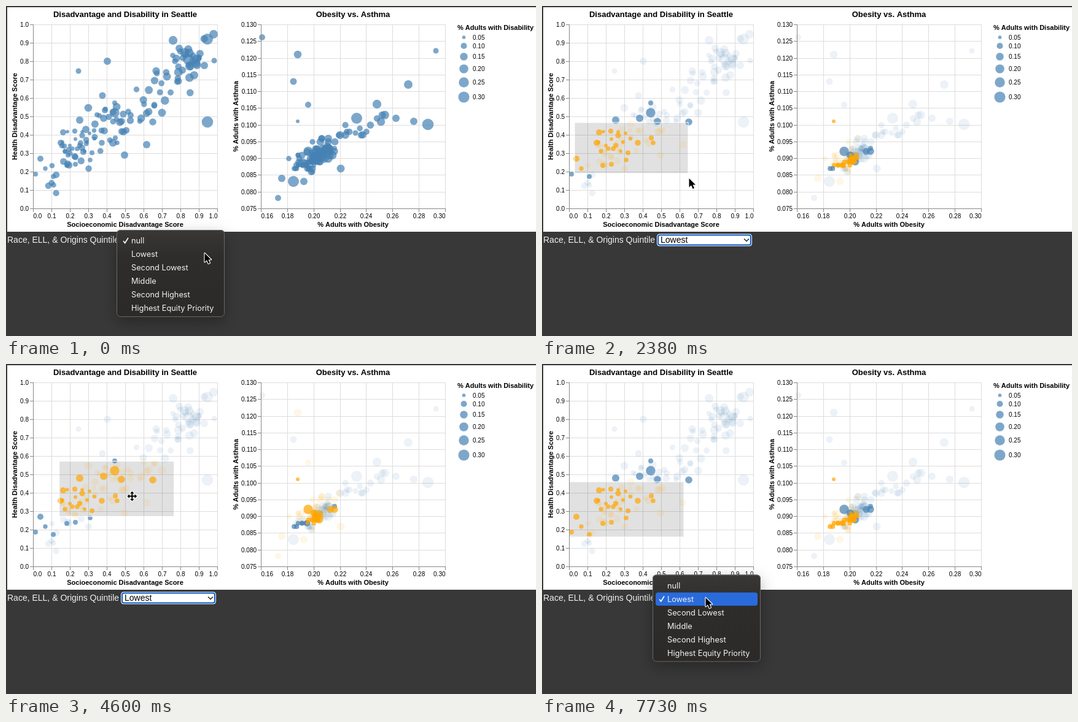
Animation, 863 px wide and 538 px high, one loop 8 s. Source, as an HTML page with a canvas:

```html
<!DOCTYPE html>
<html lang="en">
<head>
<meta charset="utf-8">
<title>Linked scatter plots</title>
<style>
html, body { margin: 0; width: 100%; height: 100%; overflow: hidden; background: #383838; }
canvas { display: block; }
</style>
</head>
<body>
<canvas id="stage" width="863" height="538"></canvas>
<script>
const ctx = document.getElementById('stage').getContext('2d');
const LOOP = 8000, STEP = 1040 / 7, LAST_STEP = 52;
const SANS = '"Liberation Sans", Arial, sans-serif';
const MENU_FONT = '12.75px Inter, sans-serif';
const BLUE = '#4682b4', ORANGE = '#ffa500';
const OPTIONS = ['null', 'Lowest', 'Second Lowest', 'Middle', 'Second Highest', 'Highest Equity Priority'];

// Each row: x, y, radius in the left plot, then x, y in the right plot if it stands out there.
const lowRows = [
  [120, 186, 6, 502, 243], [159, 183, 6, 510, 254], [177, 158, 4, 535, 232], [177, 174, 7.7, 492, 237],
  [188, 188, 5.8, 528, 237], [239, 189, 5.8, 535, 237], [113, 217, 3, 475, 188],
  [48, 274, 4], [56, 249, 5], [64, 265, 3.7], [77, 278, 4], [89, 223, 5], [93, 206, 5], [99, 260, 4],
  [113, 258, 4], [137, 251, 3.8], [124, 211, 4.7], [156, 223, 4.8], [178, 215, 4], [181, 223, 3.8]];
const restRows = [
  [328, 189, 9.3, 687, 193], [338, 46, 7, 655, 128], [339, 89, 4.5, 700, 73], [323, 97, 6, 635, 183],
  [282, 69, 6, 664, 188], [268, 141, 5, 417, 51], [134, 166, 6.3, 475, 79], [328, 54, 9, 571, 183],
  [297, 87, 9, 468, 286], [157, 146, 5.5, 468, 123], [161, 170, 5, 492, 161], [203, 178, 5, 443, 313],
  [165, 90, 6, 581, 210], [118, 106, 4.5, 569, 207], [229, 226, 6, 449, 281], [193, 243, 6, 485, 286],
  [254, 174, 6.5, 545, 265], [272, 56, 7.2, 604, 160]];

// Step, x, y
const pointer = [
  [0, 323, 402], [1, 300, 404], [3, 290, 402], [8, 55, 191], [10, 53, 190], [16, 239, 280],
  [17, 241, 299], [20, 228, 282], [24, 168, 238], [26, 168, 238], [28, 171, 248], [33, 224, 198],
  [37, 224, 198], [38, 223, 197], [43, 146, 251], [45, 145, 254], [46, 145, 254], [52, 266, 380]];
const brushSize = [[10, 0, 0], [16, 185, 83], [17, 187, 90]];
const brushPlace = [
  [19, 53, 190], [24, 44, 190], [26, 44, 190], [28, 44, 200], [33, 110, 136], [37, 110, 136],
  [38, 107, 135], [43, 44, 189], [45, 44, 192]];

function random(seed) {
  return () => {
    seed = (seed * 1664525 + 1013904223) >>> 0;
    return seed / 4294967296;
  };
}
const rnd = random(29);
const spread = () => rnd() + rnd() - 1;

const obesityX = v => 415.5 + (Math.round(v * 1000) - 160) * 300 / 140;
const asthmaY = v => 330.5 - (Math.round(v * 1000) - 75) * 300 / 55;

function lowPoint([lx, ly, r, rx, ry]) {
  const t = Math.min(1, Math.max(0, (278 - ly) / 75));
  return {
    lx, ly, r, low: true,
    rx: rx || obesityX(0.188 + 0.017 * t + 0.005 * spread()),
    ry: ry || asthmaY(0.0872 + 0.003 * t + 0.0015 * spread())
  };
}

function smallLow(i) {
  const lx = 92 + 4 * i;
  return lowPoint([lx, 222 + 18 * Math.sin(i * 2.2), 2.7 + 1.6 * rnd()]);
}

// Correlated cloud along the diagonal of both plots.
function restPoint(i, count) {
  const t = i / (count - 1), cluster = i % 5 === 0 && t > 0.3;
  const lx = cluster ? 300 + 30 * spread() : 72 + 250 * t + 14 * spread();
  const ly = cluster ? 88 + 24 * spread() : 270 - 0.76 * (lx - 72) + 48 * spread();
  const core = i % 5 < 3;
  const u = core ? 0.196 + 0.015 * t : 0.184 + 0.062 * t * t + 0.01 * t;
  const rise = core ? 0.0885 + 0.0045 * t : 0.0865 + 0.015 * t;
  return {
    lx, ly, r: 3 + 2 * t + 2.6 * rnd(), low: false,
    rx: obesityX(u + 0.005 * spread()),
    ry: asthmaY(rise + 0.003 * spread())
  };
}

const points = [
  ...restRows.map(([lx, ly, r, rx, ry]) => ({ lx, ly, r, rx, ry, low: false })),
  ...Array.from({ length: 96 }, (_, i) => restPoint(i, 96)),
  ...lowRows.map(lowPoint),
  ...Array.from({ length: 14 }, (_, i) => smallLow(i))];

function sample(keys, s) {
  if (s <= keys[0][0]) return keys[0].slice(1);
  const n = keys.findIndex(k => k[0] >= s);
  if (n < 0) return keys[keys.length - 1].slice(1);
  const a = keys[n - 1], b = keys[n], u = (s - a[0]) / (b[0] - a[0]);
  const e = u * u * (3 - 2 * u);
  return a.slice(1).map((v, i) => v + (b[i + 1] - v) * e);
}

function text(str, x, y, font, align = 'left', color = '#000') {
  ctx.font = font;
  ctx.textAlign = align;
  ctx.fillStyle = color;
  ctx.fillText(str, x, y);
}

function line(color, width, ...p) {
  ctx.strokeStyle = color;
  ctx.lineWidth = width;
  ctx.beginPath();
  for (let i = 0; i < p.length; i += 2) ctx.lineTo(p[i], p[i + 1]);
  ctx.stroke();
}

function roundBox(x, y, w, h, r, fill) {
  ctx.beginPath();
  ctx.roundRect(x, y, w, h, r);
  ctx.fillStyle = fill;
  ctx.fill();
}

function dot(x, y, r, color, alpha) {
  ctx.globalAlpha = alpha;
  ctx.fillStyle = color;
  ctx.beginPath();
  ctx.arc(x, y, r, 0, 7);
  ctx.fill();
  ctx.globalAlpha = 1;
}

function verticalText(str, x, y) {
  ctx.save();
  ctx.translate(x, y);
  ctx.rotate(-Math.PI / 2);
  text(str, 0, 0, 'bold 11px ' + SANS, 'center');
  ctx.restore();
}

const tickAt = (i, list) => Math.round(i * 300 / (list.length - 1)) + 0.5;

function grid(x, xTicks, yTicks) {
  xTicks.forEach((_, i) => line('#ddd', 1, x + tickAt(i, xTicks), 30, x + tickAt(i, xTicks), 330));
  yTicks.forEach((_, i) => line('#ddd', 1, x, 30 + tickAt(i, yTicks), x + 300, 30 + tickAt(i, yTicks)));
}

function axes(x, xTicks, yTicks, xTitle, yTitle, yTitleX, title) {
  const font = '10px ' + SANS, end = xTicks.length - 1;
  line('#888', 1, x + 0.5, 30, x + 0.5, 331);
  line('#888', 1, x, 330.5, x + 301, 330.5);
  xTicks.forEach((label, i) => {
    const px = x + tickAt(i, xTicks);
    line('#888', 1, px, 330, px, 336);
    text(label, px, 346, font, i === 0 ? 'left' : i === end ? 'right' : 'center');
  });
  yTicks.forEach((label, i) => {
    const py = 30 + tickAt(i, yTicks);
    line('#888', 1, x - 5, py, x, py);
    text(label, x - 7, py + 3.5, font, 'right');
  });
  text(xTitle, x + 150, 360, 'bold 11px ' + SANS, 'center');
  verticalText(yTitle, yTitleX, 180);
  text(title, x + 150, 18, 'bold 13px ' + SANS, 'center');
}

const ticks = (n, from, by, digits) => Array.from({ length: n }, (_, i) => (from + i * by).toFixed(digits));
const score = ticks(11, 0, 0.1, 1), scoreDown = [...score].reverse();
const obesityTicks = ticks(8, 0.16, 0.02, 2), asthmaTicks = ticks(12, 0.13, -0.005, 3);

function legend() {
  text('% Adults with Disability', 735, 39, 'bold 11px ' + SANS);
  [51, 65, 82.5, 102.5, 124.5, 148.5].forEach((y, i) => {
    dot(745.5, y, 3.85 * Math.sqrt(i + 1) - (i ? 0.4 : 1), BLUE, 0.7);
    text((0.05 * (i + 1)).toFixed(2), 760, y + 3.5, '10px ' + SANS);
  });
}

function charts(filtered, [x, y], [w, h]) {
  ctx.fillStyle = '#fff';
  ctx.fillRect(2, 2, 861, 366);
  grid(44, score, scoreDown);
  grid(415, obesityTicks, asthmaTicks);
  const active = w > 1;
  if (active) {
    ctx.fillStyle = 'rgba(51,51,51,0.145)';
    ctx.fillRect(x, y, w, h);
  }
  for (const p of points) {
    const inside = active && p.lx >= x && p.lx <= x + w && p.ly >= y && p.ly <= y + h;
    const color = inside ? ORANGE : BLUE;
    const alpha = !filtered || p.low ? 0.7 : 0.1;
    dot(p.lx, p.ly, p.r, color, alpha);
    dot(p.rx, p.ry, p.r, color, alpha);
  }
  if (active) {
    ctx.strokeStyle = '#fff';
    ctx.lineWidth = 1;
    ctx.strokeRect(x, y, w, h);
  }
  axes(44, score, scoreDown, 'Socioeconomic Disadvantage Score', 'Health Disadvantage Score', 18,
    'Disadvantage and Disability in Seattle');
  axes(415, obesityTicks, asthmaTicks, '% Adults with Obesity', '% Adults with Asthma', 378, 'Obesity vs. Asthma');
  legend();
}

function selectBox() {
  text('Race, ELL, & Origins Quintile', 2, 386, '14px ' + SANS, 'left', '#f0f0f0');
  roundBox(187, 371.5, 155, 20, 4.5, '#fff');
  roundBox(188, 372.5, 153, 18, 4, '#0a5cc8');
  roundBox(190, 374.5, 149, 14, 2, '#fff');
  text('Lowest', 193, 386, '14px ' + SANS);
  line('#222', 1.4, 329, 379.5, 333, 383.5, 337, 379.5);
}

function menu(top, checked, hover) {
  ctx.save();
  ctx.shadowColor = 'rgba(0,0,0,0.3)';
  ctx.shadowBlur = 24;
  ctx.shadowOffsetY = 8;
  const shade = ctx.createLinearGradient(0, top, 0, top + 142);
  shade.addColorStop(0, '#393837');
  shade.addColorStop(0.3, '#2f2d2b');
  shade.addColorStop(1, '#2c2a28');
  roundBox(180, top, 176, 142, 6, shade);
  ctx.restore();
  ctx.strokeStyle = '#6a6967';
  ctx.lineWidth = 1;
  ctx.beginPath();
  ctx.roundRect(180.5, top + 0.5, 175, 141, 6);
  ctx.stroke();
  OPTIONS.forEach((label, i) => {
    const y = top + 17.5 + 22 * i;
    if (i === hover) roundBox(185, y - 10.5, 166, 21.5, 4, '#2a6bdc');
    text(label, 204, y + 4.5, MENU_FONT, 'left', '#f1f1f1');
    if (i === checked) line('#fff', 1.6, 191, y + 0.5, 193.7, y + 4, 199, y - 4.5);
  });
}

const arrow = new Path2D('M0.5 1V15.5L4 12.3L6.5 18L9 17L6.6 11.4H11Z');
const moveArm = new Path2D('M-1 1V-4.3H-3.3L0-8L3.3-4.3H1V1Z');

function cursor(x, y, moving) {
  ctx.save();
  ctx.translate(x, y);
  ctx.lineJoin = 'round';
  ctx.lineWidth = 2.2;
  ctx.strokeStyle = '#fff';
  ctx.fillStyle = '#000';
  const shape = moving ? moveArm : arrow, turns = moving ? 4 : 1;
  for (const paint of ['stroke', 'fill']) {
    for (let i = 0; i < turns; i++) {
      ctx[paint](shape);
      if (moving) ctx.rotate(Math.PI / 2);
    }
  }
  ctx.restore();
}

function draw(time) {
  const s = Math.min(LAST_STEP, Math.floor((time % LOOP + 6) / STEP));
  ctx.fillStyle = '#383838';
  ctx.fillRect(0, 0, 863, 538);
  charts(s >= 3, sample(brushPlace, s), sample(brushSize, s));
  selectBox();
  if (s < 3) menu(365, 0, s > 0 ? 1 : -1);
  if (s >= 51) menu(343.5, 1, 1);
  const [x, y] = sample(pointer, s);
  cursor(x, y, s >= 20 && s <= 46);
}

const start = performance.now();
function tick() {
  draw(performance.now() - start);
  requestAnimationFrame(tick);
}
tick();
</script>
</body>
</html>
```
